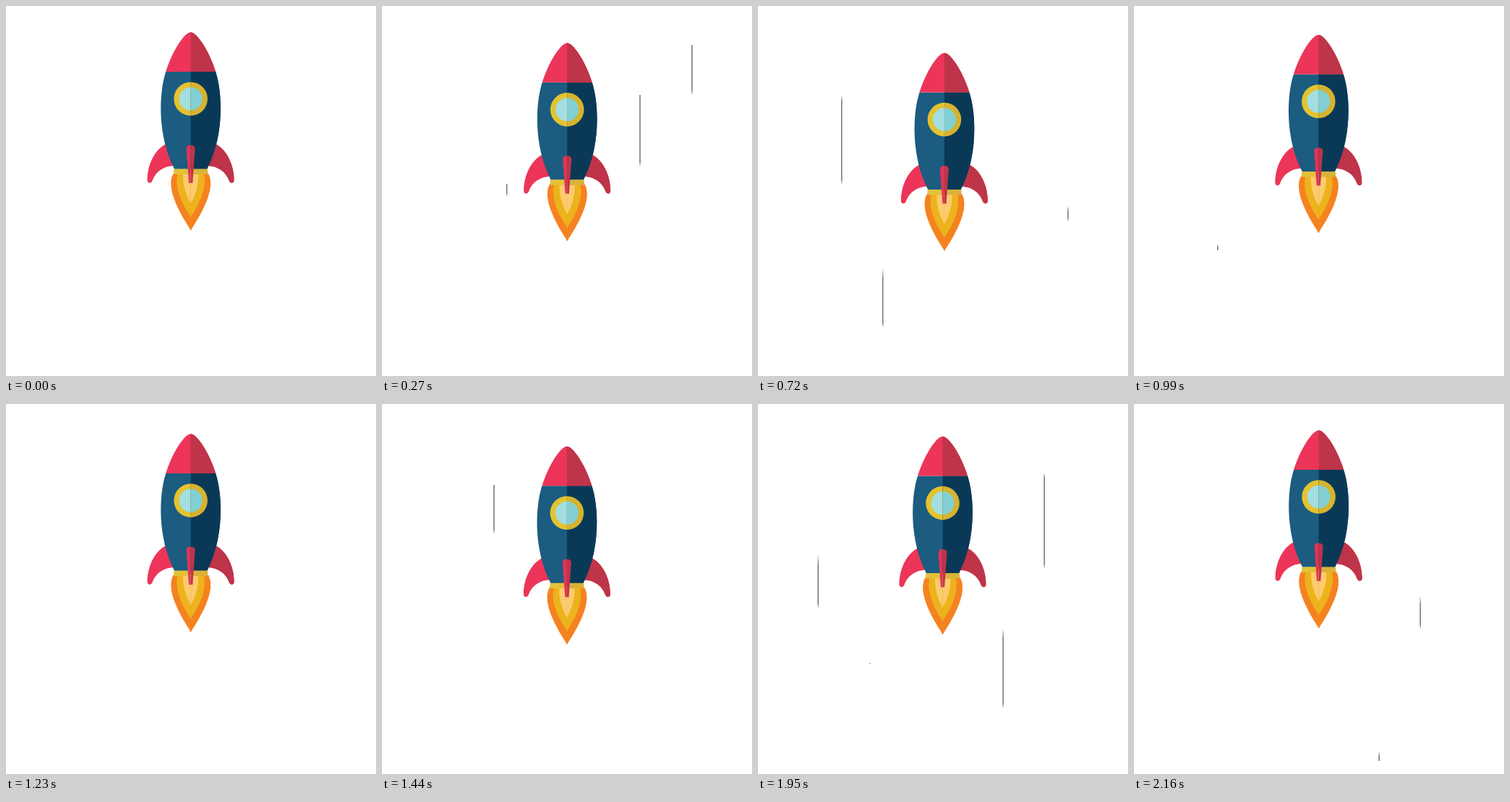
Write an HTML page with a canvas that moves like this. It is 512 by 512 pixels and loops after 2.19 s.

```html
<!DOCTYPE html>
<html lang="en">
<head>
<meta charset="utf-8">
<title>Rocket</title>
<style>
  html, body { margin: 0; width: 100%; height: 100%; overflow: hidden; background: #fff; }
  canvas { display: block; width: 512px; height: 512px; }
</style>
</head>
<body>
<canvas id="stage" width="512" height="512"></canvas>
<script>
const ctx = document.getElementById('stage').getContext('2d');
const LOOP = 2190, STEP = 30;

// Right half of each part around x = 0: path, colour in light, colour in shade.
const parts = [
  ['M34.5 191C48.5 198 60 218 60 241C60 246 54.5 246 53 241.5C48.5 229 38 222 24 221L0 210z', '#ec3559', '#be3449'],
  ['M-1 230H22.5C30.5 239 32 262 0 310H-1z', '#f58220', '#f58220'],
  ['M-1 230H17.5C21.5 243 19.5 263 0 292H-1z', '#ecb31c', '#ecb31c'],
  ['M-1 230H10.5C11.5 245 7.5 260 0 273H-1z', '#fccb6f', '#fccb6f'],
  ['M-1 91H34.5C44.5 122 46 181 22.5 225.8H-1z', '#1b5c80', '#0a3957'],
  ['M-1 36.5H0C9.5 36.5 26.5 65 34.5 91H-1z', '#ec3559', '#be3449'],
  ['M-1 225.4H22.4Q23.4 225.4 23.4 226.4V232Q23.4 233 22.4 233H-1z', '#e5c03a', '#d9b23a'],
  ['M-1 105.2H0a23.3 23.3 0 0 1 0 46.6H-1z', '#e4c32f', '#d6b32f'],
  ['M-1 112.5H0a16 16 0 0 1 0 32H-1z', '#a3dee1', '#82cfd4'],
  ['M-1 192.4H0C3.5 192.4 6.2 194 6 197.5L2.6 245H-1z', '#e0345a', '#be3449']
].map(([d, light, shade]) => ({ path: new Path2D(d), light, shade }));

// Speed lines: x, top, bottom, start time.
const streaks = [
  [357, 123, 358, 14],
  [429, 54, 299, 101],
  [172.7, 246, 497, 232],
  [115.8, 100, 338, 342],
  [155, 112, 360, 1276],
  [83.2, 84, 329, 1451],
  [339.2, 253, 494, 1522],
  [396.2, 88, 337, 1607]
];

// Rocket drift: [time, offset], eased between keys.
const driftX = [[0, 0], [270, .6], [650, 2.6], [990, -.3], [1440, .3], [1740, -.2], [LOOP, 0]];
const driftY = [[0, 0], [560, 31.5], [630, 31.5], [1090, 0], [1590, 28], [2165, 0], [LOOP, 0]];

const clamp = v => Math.min(1, Math.max(0, v));
const ease = v => (1 - Math.cos(Math.PI * clamp(v))) / 2;

function sample(keys, t) {
  const i = keys.findIndex(k => k[0] > t);
  const [t0, v0] = keys[i - 1], [t1, v1] = keys[i];
  return v0 + (v1 - v0) * ease((t - t0) / (t1 - t0));
}

const head = t => clamp(t / 625);
const tail = t => ease((t - 290) / 400);

// Moving ends fade over the distance covered during the shutter time.
function drawStreak([x, top, bottom, start], time) {
  const t = time - start, shutter = 8;
  if (t < 0 || t > 695) return;
  const at = f => top + (bottom - top) * f;
  const a0 = at(tail(t - shutter)), a1 = at(tail(t + shutter));
  const b0 = at(head(t - shutter)), b1 = at(head(t + shutter));
  const len = b1 - a0;
  if (len <= 0) return;
  const fade = ctx.createLinearGradient(0, a0, 0, b1);
  const solid = 'rgba(116,116,116,1)', clear = 'rgba(116,116,116,0)';
  const s0 = clamp((a1 - a0) / len);
  const s1 = Math.max(s0, clamp((b0 - a0) / len));
  fade.addColorStop(0, s0 > 0 ? clear : solid);
  fade.addColorStop(s0, solid);
  fade.addColorStop(s1, solid);
  fade.addColorStop(1, s1 < 1 ? clear : solid);
  ctx.fillStyle = fade;
  ctx.fillRect(x - .75, a0, 1.5, len);
}

function fillParts(tone) {
  for (const part of parts) {
    ctx.fillStyle = part[tone];
    ctx.fill(part.path);
    if (tone === 'light') {
      ctx.save();
      ctx.scale(-1, 1);
      ctx.fill(part.path);
      ctx.restore();
    }
  }
}

function drawRocket(t) {
  ctx.save();
  ctx.translate(255.6 + sample(driftX, t), sample(driftY, t));
  fillParts('light');
  ctx.beginPath();
  ctx.rect(0, 0, 100, 400);
  ctx.clip();
  fillParts('shade');
  ctx.restore();
}

function draw(t) {
  ctx.fillStyle = '#fff';
  ctx.fillRect(0, 0, 512, 512);
  for (const s of streaks) drawStreak(s, t);
  drawRocket(t);
}

const begin = performance.now();
function tick() {
  const t = Math.max(0, performance.now() - begin) % LOOP;
  draw(Math.floor(t / STEP) * STEP);
  requestAnimationFrame(tick);
}
tick();
</script>
</body>
</html>
```
